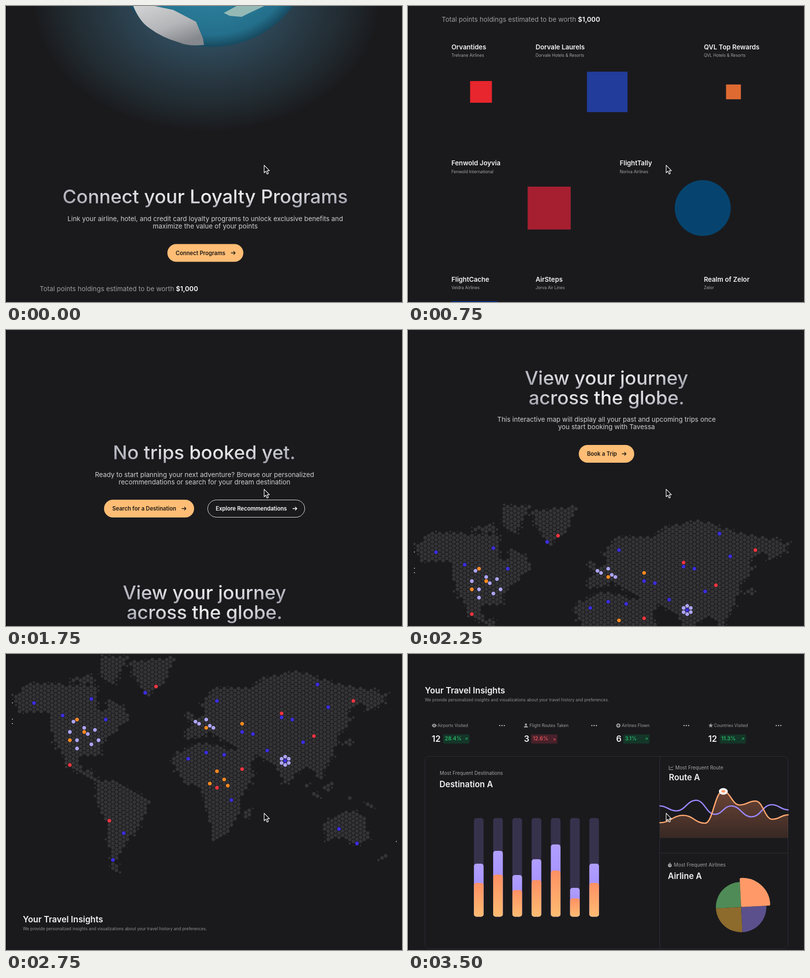
An HTML page that plays this animation: 800x600 px, repeating every 3.75 s.

```html
<!DOCTYPE html>
<html lang="en">
<head>
<meta charset="utf-8">
<title>Loyalty dashboard scroll</title>
<style>
  html, body { margin: 0; width: 100%; height: 100%; overflow: hidden; background: #1a1a1d; }
  #stage { position: relative; width: 800px; height: 600px; overflow: hidden; background: #1a1a1d; }
  #page { position: absolute; left: 0; top: 0; }
  #cursor { position: absolute; left: 520px; top: 321px; }
  #edge { position: absolute; left: 0; top: 0; width: 1px; height: 600px; background: #050506; }
  text { font-family: Inter, "Open Sans", sans-serif; fill: #f3f3f5; }
  .hero { font-size: 38.2px; font-weight: 500; text-anchor: middle; fill: url(#silver); }
  .lead { font-size: 13.35px; text-anchor: middle; fill: #d0d0d4; }
  .btn { font-size: 11.15px; font-weight: 600; }
  .total { font-size: 13.35px; fill: #9d9da2; }
  .total tspan { font-weight: 600; fill: #fff; }
  .name { font-size: 13.2px; font-weight: 600; }
  .org { font-size: 8.4px; fill: #a6a6ab; }
  .h2 { font-size: 17px; font-weight: 600; }
  .h3 { font-size: 16.7px; font-weight: 600; }
  .note { font-size: 8.4px; fill: #8f8f95; }
  .stat { font-size: 8.5px; fill: #9d9da2; }
  .num { font-size: 17px; font-weight: 600; }
  .pct { font-size: 10.6px; font-weight: 500; }
  .cap { font-size: 9.85px; fill: #a3a3a8; }
  .line { fill: none; stroke-width: 2.6; stroke-linecap: round; }
</style>
</head>
<body>
<div id="stage">
<svg id="page" width="800" height="3200" viewBox="0 0 800 3200">
  <defs>
    <radialGradient id="silver" cx=".5" cy=".4" r=".6">
      <stop offset="0" stop-color="#f4f4f6"/><stop offset=".55" stop-color="#d4d4da"/><stop offset="1" stop-color="#a4a4af"/>
    </radialGradient>
    <radialGradient id="glow">
      <stop offset="0" stop-color="#35586b"/><stop offset=".38" stop-color="#2e4757"/>
      <stop offset=".62" stop-color="#273640"/><stop offset=".84" stop-color="#20282d"/>
      <stop offset="1" stop-color="#1a1a1d"/>
    </radialGradient>
    <radialGradient id="sea">
      <stop offset=".55" stop-color="#2b7f9b"/><stop offset=".88" stop-color="#246f8b"/><stop offset="1" stop-color="#174a60"/>
    </radialGradient>
    <linearGradient id="ice" x2=".6" y2="1">
      <stop offset="0" stop-color="#d3d4d4"/><stop offset=".6" stop-color="#b4b5b8"/><stop offset="1" stop-color="#85888d"/>
    </linearGradient>
    <linearGradient id="warm" x2="0" y2="1">
      <stop offset="0" stop-color="#ff9064"/><stop offset="1" stop-color="#ffbc72"/>
    </linearGradient>
    <linearGradient id="violet" x2="0" y2="1">
      <stop offset="0" stop-color="#b09fff"/><stop offset="1" stop-color="#9b86ff"/>
    </linearGradient>
    <linearGradient id="area" x2="0" y2="1">
      <stop offset="0" stop-color="#ff9464" stop-opacity=".36"/><stop offset="1" stop-color="#ff8a5a" stop-opacity=".13"/>
    </linearGradient>
    <path id="arrow" d="M0 0H8M5-3L8 0 5 3" fill="none" stroke-width="1.4" stroke-linecap="round" stroke-linejoin="round"/>
  </defs>

  <ellipse cx="405" cy="-10" rx="350" ry="264" fill="url(#glow)"/>
  <circle cx="415" cy="-122.5" r="205.5" fill="url(#sea)"/>
  <path d="M257 0Q270 32 290 45 315 64 350 74 368 82 400 79L398 66 384 32 338 8 300 0Z" fill="url(#ice)"/>
  <path d="M440 14L466 0H522L494 13 476 22 452 20Z" fill="#a9c6bd" opacity=".85"/>

  <text class="hero" x="402.5" y="400">Connect your Loyalty Programs</text>
  <text class="lead" x="402.5" y="436">Link your airline, hotel, and credit card loyalty programs to unlock exclusive benefits and</text>
  <text class="lead" x="402.5" y="451">maximize the value of your points</text>
  <text class="total" x="68" y="578">Total points holdings estimated to be worth <tspan>$1,000</tspan></text>
  <g id="cards" transform="translate(0 546)"></g>

  <g transform="translate(0 1336)">
    <text class="hero" x="400.5" y="262">No trips booked yet.</text>
    <text class="lead" x="401" y="297.5">Ready to start planning your next adventure? Browse our personalized</text>
    <text class="lead" x="401" y="312.5">recommendations or search for your dream destination</text>
  </g>
  <g transform="translate(0 1771)">
    <text class="hero" x="401" y="111">View your journey</text>
    <text class="hero" x="401" y="151">across the globe.</text>
    <text class="lead" x="401" y="186">This interactive map will display all your past and upcoming trips once</text>
    <text class="lead" x="401" y="201">you start booking with Tavessa</text>
  </g>
  <g id="buttons"></g>
  <g id="map" transform="translate(0 2122)"></g>

  <g transform="translate(0 2586)">
    <text class="h2" x="34" y="80">Your Travel Insights</text>
    <text class="note" x="34" y="96">We provide personalized insights and visualizations about your travel history and preferences.</text>
    <g id="stats"></g>
    <g fill="none" stroke="#2d2b37">
      <rect x="34.5" y="207.5" width="733" height="390" rx="8"/>
      <path d="M508.5 208V597M508 403.5H768"/>
    </g>
    <text class="cap" x="64" y="244.5">Most Frequent Destinations</text>
    <text class="h3" x="63.5" y="270">Destination A</text>
    <g id="bars"></g>

    <path d="M527.5 226.5V234.5H536M529.5 232L532 229 533.5 230.5 536 227.5" fill="none" stroke="#a3a3a8"/>
    <text class="cap" x="540" y="233.5">Most Frequent Route</text>
    <text class="h3" x="527" y="256">Route A</text>
    <g id="routes"></g>
    <ellipse cx="637" cy="278.5" rx="9" ry="6.7" fill="#fff"/>
    <ellipse cx="637" cy="278.5" rx="4" ry="2.4" fill="#ff9a68"/>

    <circle cx="529" cy="428.5" r="3.8" fill="#a3a3a8"/>
    <path d="M527.5 423.5H530.5" stroke="#a3a3a8"/>
    <path d="M529 429L530.6 426.6" stroke="#1a1a1d"/>
    <text class="cap" x="537" y="430.5">Most Frequent Airlines</text>
    <text class="h3" x="525" y="456">Airline A</text>
    <g transform="translate(673 513) rotate(-3)">
      <path d="M0 0H-51A51 51 0 0 1 0-51Z" fill="#4f8b57"/>
      <path d="M0 0V51A51 51 0 0 1-51 0Z" fill="#8d6b2d"/>
      <path d="M0 0H51A51 51 0 0 1 0 51Z" fill="#5b508c"/>
      <path d="M3-3V-56A53 53 0 0 1 56-3Z" fill="#ff9a68" stroke="#ff9a68" stroke-width="6" stroke-linejoin="round"/>
    </g>
  </g>
</svg>
<svg id="cursor" width="16" height="24" viewBox="0 0 16 24">
  <path d="M1.5 1.8V17L5 13.8 7.4 19.6 10 18.5 7.6 12.8H12.2Z" fill="#0a0a0a" stroke="#fff" stroke-width="1.2" stroke-linejoin="round"/>
</svg>
<div id="edge"></div>
</div>

<script>
const $ = id => document.getElementById(id);
const put = (id, html) => { $(id).innerHTML = html; };

// Scroll: one wheel jump every 250 ms, then back to the top
const jumps = [0, 110, 226, 210, 60, 301, 57, 372, 72, 363, 115, 236, 205, 166, 93];
let top_ = 0;
const stops = jumps.map(d => `translateY(${-(top_ += d)}px)`);
$('page').animate(
  [...stops, stops.at(-1)].map(transform => ({ transform, easing: 'step-end' })),
  { duration: 250 * jumps.length, iterations: Infinity, delay: -0.5 });

// Loyalty cards on a four-column grid; the brand mark is centred on its own column position
const card = (col, row, name, org, mark, size, color, round) => {
  const x = 87.7 + 170 * col, y = 87.6 + 235.5 * row;
  const mx = 147.5 + 170 * mark - size / 2, my = y + 86.5 - size / 2;
  return `<text class="name" x="${x}" y="${y}">${name}</text>
    <text class="org" x="${x}" y="${y + 15.4}">${org}</text>
    <rect x="${mx}" y="${my}" width="${size}" height="${size}" rx="${round ? size / 2 : 0}" fill="${color}"/>`;
};
put('cards',
  card(0, 0, 'Orvantides', 'Trelvane Airlines', 0, 44, '#e8262d') +
  card(1, 0, 'Dorvale Laurels', 'Dorvale Hotels &amp; Resorts', 1.5, 82, '#213c9a') +
  card(3, 0, 'QVL Top Rewards', 'QVL Hotels &amp; Resorts', 3, 30, '#de6a32') +
  card(0, 1, 'Fenwold Joyvia', 'Fenwold International', 0.81, 87, '#a51f30') +
  card(2, 1, 'FlightTally', 'Noriva Airlines', 2.635, 113, '#06446f', true) +
  card(0, 2, 'FlightCache', 'Veldra Airlines', -0.08, 93, '#0433a3') +
  card(1, 2, 'AirSteps', 'Jorva Air Lines', 1.5, 30, '#12467f') +
  card(3, 2, 'Realm of Zelor', 'Zelor', 3, 30, '#4a76ad'));

// Pill buttons
const pill = (x, y, w, label, ghost) => {
  const ink = ghost ? '#fff' : '#1c1814';
  const box = ghost ? 'fill="none" stroke="#e6e6e8"' : 'fill="#ffbd75"';
  const o = ghost ? 0.5 : 0;
  return `<rect x="${x + o}" y="${y + o}" width="${w - 2 * o}" height="${36 - 2 * o}" rx="18" ${box}/>
    <text class="btn" x="${x + 16.7}" y="${y + 22}" style="fill:${ink}">${label}</text>
    <use href="#arrow" x="${x + w - 24.5}" y="${y + 18}" stroke="${ink}"/>`;
};
put('buttons',
  pill(326, 482.5, 153.5, 'Connect Programs') +
  pill(198, 1680, 182, 'Search for a Destination') +
  pill(407, 1680, 197, 'Explore Recommendations', true) +
  pill(345, 2004, 112, 'Book a Trip'));

// World map: rough coastlines filled with a hexagon grid
const land = new Path2D(
  // North America, Arctic islands, Greenland
  'M16 84L48 58 180 66 182 112 206 116 208 92 240 108 248 132 196 178 188 206 148 206 152 234 174 234 182 256 122 224 92 160 84 116 28 118Z' +
  'M120 54L174 42 176 60ZM190 8L250 4 216 64 196 50ZM250 16L344 4 318 60 284 88 262 50Z' +
  // South America, Africa
  'M184 254L222 256 292 298 278 336 240 388 222 420 228 442 212 434 206 350 180 290Z' +
  'M344 200L400 178 472 200 500 244 470 300 472 325 446 366 420 380 396 276 356 258 336 218Z' +
  // Eurasia
  'M362 174L362 150 404 124 396 100 420 70 500 68 520 48 590 33 660 58 776 82 732 120 720 102 688 112 696 136 ' +
  '670 165 664 196 640 236 640 258 610 226 572 256 562 262 544 222 505 205 490 240 462 190 412 162Z' +
  // Islands, Australia
  'M368 112L384 136 368 136ZM604 262L634 292 624 294ZM640 266L660 260 650 286ZM690 290L746 308 740 316Z' +
  'M482 320L494 314 488 352ZM700 164L696 184 676 190Z' +
  'M642 345L690 316 722 328 734 372 708 388 690 374 646 376ZM758 414L784 392 770 410Z');
const ctx = document.createElement('canvas').getContext('2d');
const isLand = (x, y) => ctx.isPointInPath(land, x, y);

const DX = 7.25, DY = 8.37, HUB = { x: 564, y: 216.6 };
const cell = (col, row) => ({ x: HUB.x + col * DX, y: HUB.y + (row + (col & 1) / 2) * DY });
const snap = (x, y) => {
  const col = Math.round((x - HUB.x) / DX);
  return cell(col, Math.round((y - HUB.y) / DY - (col & 1) / 2));
};
const hex = ({ x, y }, r) => {
  const w = r / 2, h = r * 0.866;
  return `M${x - r} ${y}l${w} ${-h}h${r}l${w} ${h} ${-w} ${h}h${-r}z`;
};
let seed = 7;
const rand = () => (seed = (seed * 16807) % 2147483647) / 2147483647;

let ground = '';
const cells = [];
for (let col = -76; col <= 30; col++) {
  for (let row = -26; row <= 28; row++) {
    const c = cell(col, row);
    const coast = [-DX, DX].some(d => isLand(c.x + d, c.y + DY / 2) || isLand(c.x + d, c.y - DY / 2));
    if (isLand(c.x, c.y)) {
      cells.push(c);
      ground += hex(c, 4.1);
    } else if (coast && rand() < 0.35) ground += hex(c, 1 + rand() * 2);
  }
}

// Pins: spread over all land, in sunflower clusters, or as a ring round the hub
const spread = (n, shift) => Array.from({ length: n }, (_, i) =>
  cells[Math.floor((i + shift) / n * cells.length)]);
const cluster = (n, x, y, rx, ry) => Array.from({ length: n }, (_, i) => {
  const r = Math.sqrt((i + 0.5) / n), a = i * 2.4;
  return snap(x + rx * r * Math.cos(a), y + ry * r * Math.sin(a));
});
const ring = Array.from({ length: 6 }, (_, i) => {
  const a = (i + 0.5) * Math.PI / 3;
  return { x: HUB.x + DY * Math.cos(a), y: HUB.y + DY * Math.sin(a) };
});
const pins = (color, ...groups) =>
  `<path d="${groups.flat().map(c => hex(c, 4.2)).join('')}" fill="${color}"/>`;
put('map', `<path d="${ground}" fill="#343437"/>` +
  pins('#3b2edb', spread(23, 0.4), [HUB]) +
  pins('#ea3640', spread(8, 0.7)) +
  pins('#ff8a22', cluster(3, 143, 160, 32, 28), cluster(4, 426, 252, 36, 18), cluster(2, 444, 144, 60, 4)) +
  pins('#ada5f6', cluster(9, 155, 165, 38, 30), cluster(5, 404, 142, 26, 8), ring) +
  '<path d="M13 99h0M13 132h0M13 141h0M788.5 380h0" stroke="#e8e8ea" stroke-width="1.8" stroke-linecap="round"/>');

// Stat tiles
const stat = (i, icon, label, num, pct, down) => {
  const x = 48 + 186.2 * i, bx = x + 6 + 8.5 * num.length;
  const ink = down ? '#ee5a5e' : '#2fc571';
  const dots = [0, 1, 2].map(k => `<circle cx="${137.3 + 4.6 * k}" r="1.2"/>`).join('');
  return `<g transform="translate(${x} 145)" fill="#9d9da2">${icon}<g fill="#c4c4c8">${dots}</g></g>
    <text class="stat" x="${x + 11.4}" y="148.2">${label}</text>
    <text class="num" x="${x}" y="178">${num}</text>
    <rect x="${bx}" y="163" width="53" height="18.5" rx="2" fill="${down ? '#48212a' : '#143628'}"/>
    <text class="pct" x="${bx + 3.5}" y="175.3" style="fill:${ink}">${pct}</text>
    <path d="M-2 2L2-2M-1.2-2H2V1.2" transform="translate(${bx + 46.5} 172.3) rotate(${down ? 90 : 0})"
      fill="none" stroke="${ink}" stroke-width=".9"/>`;
};
const eye = '<path d="M0 0Q5-7.5 10 0 5 7.5 0 0Z"/><circle cx="5" r="1.8" fill="#1a1a1d"/><circle cx="5" r=".9"/>';
const person = '<circle cx="4" cy="-2" r="2.2"/><path d="M0 4Q0 .8 4 .8T8 4Z"/>';
const plus = '<circle cx="4.5" r="4.3"/><path d="M2 0H7M4.5-2.5V2.5" stroke="#1a1a1d" stroke-width="1.2"/>';
const star = `<path d="M${Array.from({ length: 10 }, (_, i) => {
  const r = i % 2 ? 2.2 : 5, a = i * Math.PI / 5;
  return `${5 + r * Math.sin(a)} ${-r * Math.cos(a)}`;
}).join('L')}Z"/>`;
put('stats',
  stat(0, eye, 'Airports Visited', '12', '28.4%') +
  stat(1, person, 'Flight Routes Taken', '3', '12.6%', true) +
  stat(2, plus, 'Airlines Flown', '6', '3.1%') +
  stat(3, star, 'Countries Visited', '12', '11.3%'));

// Stacked bars: the warm part is a fixed share of the violet part
const bar = (x, h, fill) =>
  `<rect x="${x}" y="${532.5 - h}" width="19.5" height="${h}" rx="5" fill="${fill}"/>`;
put('bars', [107.5, 133.5, 84.5, 116.5, 146.5, 58.5, 107.5].map((h, i) => {
  const x = 133.2 + 38.85 * i;
  return bar(x, 200, '#37324c') + bar(x, h, 'url(#violet)') + bar(x, h * 0.638, 'url(#warm)');
}).join(''));

// Smooth curve through its peaks and dips
const wave = pts => pts.map(([x, y], i) => {
  if (!i) return `M${x} ${y}`;
  const [px, py] = pts[i - 1], m = (x - px) * 0.45;
  return `C${px + m} ${py} ${x - m} ${y} ${x} ${y}`;
}).join('');
const orange = wave([[509, 342], [556, 327], [600, 343], [636, 278], [670, 306], [702, 298], [736, 335], [768, 326]]);
const violet = wave([[509, 308], [542, 318], [582, 296.5], [620, 325], [653, 308], [694, 330], [735, 305.5], [768, 316]]);
put('routes', `<path d="${orange}V373H509Z" fill="url(#area)"/>
  <path class="line" d="${violet}" stroke="#9a88ff"/>
  <path class="line" d="${orange}" stroke="#ffa870"/>`);
</script>
</body>
</html>
```
